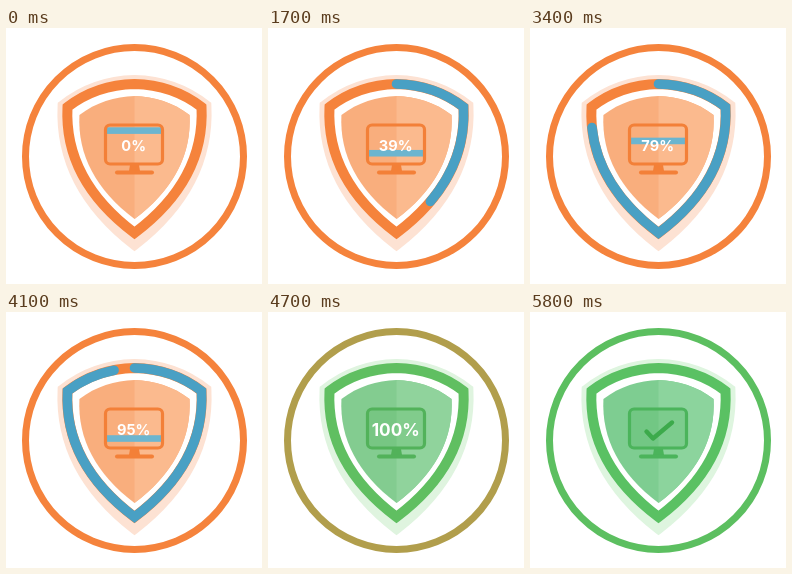
An HTML page that plays this animation: 256 px wide and 256 px high, repeating every 5.9 s.

```html
<!DOCTYPE html>
<html lang="en">
<head>
<meta charset="utf-8">
<title>Shield scan</title>
<style>
html, body { margin: 0; width: 100%; height: 100%; overflow: hidden; background: #fff; }
svg { display: block; width: 100vw; height: 100vh; }
text { font: 700 14.6px Inter, "Open Sans", sans-serif; fill: #fff; text-anchor: middle; }
</style>
</head>
<body>
<svg viewBox="0 0 256 256">
  <defs>
    <path id="shield" pathLength="100" d="M128.5 56C152 56.5 176 64 195.5 79C198 128 175 170 128.5 205C82 170 59 128 61.5 79C81 64 105 56.5 128.5 56Z"/>
    <clipPath id="rightHalf"><rect x="128.5" y="0" width="128" height="256"/></clipPath>
  </defs>
  <circle id="ring" cx="128.5" cy="128.5" r="109" fill="none" stroke-width="7"/>
  <use id="halo" href="#shield" stroke-width="9.2" transform="translate(128.5 52) scale(1.074 1.107) translate(-128.5 -56)"/>
  <use id="rim" href="#shield" fill="#fff" stroke-width="10"/>
  <use id="left" href="#shield" transform="translate(128.5 68) scale(.822 .826) translate(-128.5 -56)"/>
  <g clip-path="url(#rightHalf)">
    <use id="right" href="#shield" transform="translate(128.5 68) scale(.822 .826) translate(-128.5 -56)"/>
  </g>
  <use id="arc" href="#shield" fill="none" stroke="#49a0c4" stroke-width="9.6" stroke-linecap="round"/>
  <rect id="bar" x="101" width="54.5" height="6.6" fill="#6cb5cf"/>
  <g id="monitor">
    <rect id="screen" x="99.5" y="97" width="57" height="39" rx="4.5" stroke-width="3.2"/>
    <path id="stem" d="M124 137h9l1 6h-11z"/>
    <path id="foot" d="M111 144.5h35" stroke-width="4" stroke-linecap="round"/>
  </g>
  <text id="label" y="5.3"></text>
  <path id="check" d="M116.5 119.5L123 126.5L142 110.5" pathLength="100" fill="none" stroke="#3caa4b" stroke-width="4.4" stroke-linecap="round" stroke-linejoin="round"/>
</svg>
<script>
const LOOP = 5900, STEP = 100, SCAN_END = 4300, SWEEP = SCAN_END / 3;

const palette = {
  ring: [[245, 131, 60], [92, 191, 96]],
  rim: [[245, 131, 60], [90, 193, 99]],
  halo: [[253, 226, 211], [222, 245, 223]],
  left: [[249, 174, 125], [126, 205, 145]],
  right: [[251, 186, 142], [140, 212, 157]],
  monitor: [[243, 128, 56], [75, 180, 91]]
};

// Key tables: [time, value]
const keys = {
  ring: [[4300, 0], [5200, 1]],
  shield: [[4300, 0], [4500, .23], [4700, .96], [4800, 1]],
  monitor: [[4300, 0], [4500, .33], [4700, .96], [4800, 1]],
  label: [[4500, 1], [4700, 1.18], [4800, 1.2], [5100, 0]],
  check: [[5100, 0], [5800, 1]]
};

const $ = id => document.getElementById(id);
const set = (id, attrs) => {
  for (const name in attrs) $(id).setAttribute(name, attrs[name]);
};

function sample(table, t) {
  if (t <= table[0][0]) return table[0][1];
  for (let i = 1; i < table.length; i++) {
    const [t0, a] = table[i - 1], [t1, b] = table[i];
    if (t < t1) return a + (b - a) * (t - t0) / (t1 - t0);
  }
  return table[table.length - 1][1];
}

function tint(name, k) {
  const [from, to] = palette[name];
  return `rgb(${from.map((c, i) => Math.round(c + (to[i] - c) * k))})`;
}

const show = (id, on) => set(id, { visibility: on ? "visible" : "hidden" });

function draw(t) {
  const done = Math.min(100, t * 100 / SCAN_END);
  const shield = sample(keys.shield, t);
  const mon = sample(keys.monitor, t);
  const halo = tint("halo", shield), ink = tint("monitor", mon);

  set("ring", { stroke: tint("ring", sample(keys.ring, t)) });
  set("halo", { fill: halo, stroke: halo });
  set("rim", { stroke: tint("rim", shield) });
  set("left", { fill: tint("left", shield) });
  set("right", { fill: tint("right", shield) });
  set("screen", { stroke: ink, fill: ink, "fill-opacity": .25 * mon });
  set("stem", { fill: ink });
  set("foot", { stroke: ink });

  const scanning = t <= SCAN_END;
  set("arc", { "stroke-dasharray": `${done} 200` });
  show("arc", scanning && t > 0);

  const phase = t / SWEEP % 2;
  set("bar", { y: 99.3 + 27.8 * (phase > 1 ? 2 - phase : phase) });
  show("bar", scanning);

  const size = sample(keys.label, t);
  $("label").textContent = Math.floor(done) + "%";
  set("label", { transform: `translate(127.7 117.3) scale(${size})` });
  show("label", size > 0);

  const drawn = sample(keys.check, t);
  set("check", { "stroke-dasharray": `${drawn * 100} 200` });
  show("check", drawn > 0);
}

const start = performance.now();
function tick() {
  const t = (performance.now() - start) % LOOP;
  draw(Math.floor(t / STEP) * STEP);
  requestAnimationFrame(tick);
}
tick();
</script>
</body>
</html>
```
